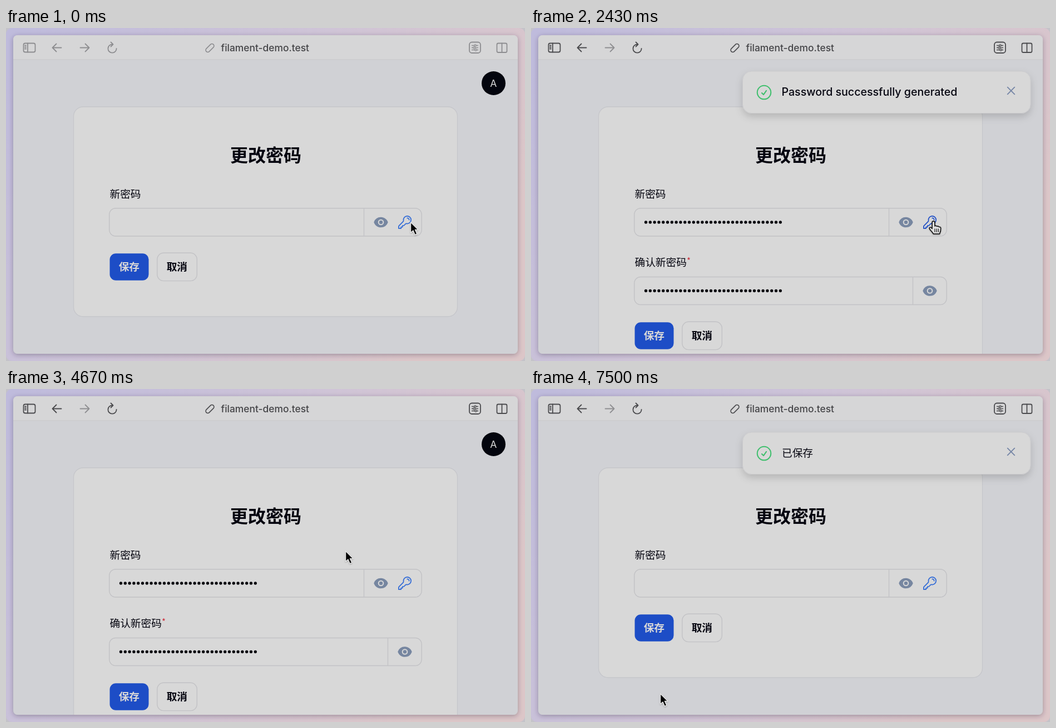
Recreate the animation shown at these times as an HTML page. Size 933x600 px, loop 7.53 s.

```html
<!DOCTYPE html>
<html lang="zh-CN">
<head>
<meta charset="utf-8">
<title>更改密码</title>
<style>
  html, body { margin: 0; width: 100%; height: 100%; overflow: hidden; background: #c4c3c9; }
  svg { display: block; width: 933px; height: 600px; }
  text { font-family: Inter, "Noto Sans CJK SC", "Noto Sans CJK", sans-serif; fill: #050510; }
  .zh { font: 500 18.7px "Noto Sans CJK SC", "Noto Sans CJK", sans-serif; }
  .title { font-size: 32px; font-weight: 700; }
  .bold { font-weight: 700; }
  .surface { fill: #d8d8d8; stroke: #c2c2c5; stroke-width: 1.4; }
  .line { fill: none; stroke-linecap: round; stroke-linejoin: round; }
  .dots { stroke: #08080f; stroke-width: 5.4; stroke-dasharray: 0 7.8; }
  .eye { fill: #7686a0; fill-rule: evenodd; }
  #tools { stroke-width: 1.8; }
</style>
</head>
<body>
<svg viewBox="0 0 933 600" xmlns="http://www.w3.org/2000/svg">
  <defs>
    <linearGradient id="wallpaper" x1="0" y1="0.1" x2="1" y2="0.5">
      <stop offset="0" stop-color="#bfbbdc"/>
      <stop offset="0.5" stop-color="#cfc4d7"/>
      <stop offset="1" stop-color="#dcc6c8"/>
    </linearGradient>
    <filter id="windowShadow" x="-5%" y="-5%" width="110%" height="112%">
      <feDropShadow dx="0" dy="2" stdDeviation="4" flood-color="#302840" flood-opacity="0.36"/>
    </filter>
    <filter id="toastShadow" x="-10%" y="-40%" width="120%" height="200%">
      <feDropShadow dx="0" dy="6" stdDeviation="7" flood-opacity="0.16"/>
    </filter>
    <filter id="cursorShadow" x="-50%" y="-50%" width="200%" height="200%">
      <feDropShadow dx="0" dy="1" stdDeviation="0.8" flood-opacity="0.3"/>
    </filter>
    <clipPath id="windowClip"><rect x="13" y="13" width="907" height="574" rx="8"/></clipPath>
    <path id="eyeIcon" class="eye" d="M10 12.5a2.5 2.5 0 1 0 0-5 2.5 2.5 0 0 0 0 5z M.664 10.59a1.651 1.651 0 0 1 0-1.186A10.004 10.004 0 0 1 10 3c4.257 0 7.893 2.66 9.336 6.41.147.381.146.804 0 1.186A10.004 10.004 0 0 1 10 17c-4.257 0-7.893-2.66-9.336-6.41zM14 10a4 4 0 1 1-8 0 4 4 0 0 1 8 0z" transform="scale(1.333) translate(-10 -10)"/>
  </defs>

  <rect width="933" height="600" rx="11" fill="url(#wallpaper)"/>
  <rect x="13" y="13" width="907" height="574" rx="8" fill="#d0d1d5" filter="url(#windowShadow)"/>

  <g clip-path="url(#windowClip)">
    <rect x="13" y="13" width="907" height="44" fill="#d6d6d7"/>
    <path d="M13 57H920" stroke="#c7c7ca" stroke-width="1.2"/>

    <g id="tools" class="line">
      <rect x="31.5" y="27.5" width="21" height="16" rx="3"/>
      <path d="M39 27.5V43.5M34 31.5h2M34 34.5h2M34 37.5h2"/>
      <path d="M99.5 35.5H83.500M90.500 28.500 83.500 35.500 90.500 42.500"/>
      <path d="M133.500 35.500H149.500M142.500 28.500 149.500 35.500 142.500 42.500" stroke="#8f8f92"/>
      <path d="M191 29.500A7.600 7.600 0 1 0 198.600 37M188.500 25.500 192.500 29.500 188.500 33.500"/>
      <g transform="translate(366.500 36) rotate(-45)" stroke-width="1.6">
        <path d="M2 -3.500H-5a3.500 3.500 0 0 0 0 7H-2.500M-2 3.500H5a3.500 3.500 0 0 0 0 -7H2.500" transform="scale(1.05)"/>
      </g>
      <rect x="833" y="25.500" width="20" height="19.500" rx="4.500"/>
      <path d="M837.500 31.500h4M845.500 31.500h3M837.500 35.500h2M843.500 35.500h5M837.500 39.500h5M846.500 39.500h2" stroke-width="1.3"/>
      <g stroke-width="1.3"><circle cx="843.500" cy="31.500" r="1.700"/><circle cx="841.500" cy="35.500" r="1.700"/><circle cx="844.500" cy="39.500" r="1.700"/></g>
      <rect x="882.500" y="27.500" width="18" height="16.500" rx="2.500"/>
      <path d="M891.500 27.500V44"/>
    </g>
    <text x="386.500" y="42" font-size="17.4" font-weight="500" style="fill:#444447">filament-demo.test</text>

    <circle cx="876.500" cy="99.500" r="21.500" fill="#03050e"/>
    <text x="876.300" y="106" font-size="17.500" text-anchor="middle" style="fill:#d8d8d8">A</text>

    <rect id="card" class="surface" x="121.500" y="142" width="690" height="378" rx="17" style="stroke:#c6c7cb"/>
    <text class="zh title" x="467" y="241" text-anchor="middle">更改密码</text>

    <text class="zh" x="186.500" y="305.500">新密码</text>
    <rect class="surface" x="185.700" y="324.700" width="561.500" height="50.300" rx="11.500"/>
    <path d="M643.500 325V375" stroke="#c2c2c5" stroke-width="1.3"/>
    <use href="#eyeIcon" x="0" y="0" transform="translate(674 350)"/>
    <path id="key" class="line" stroke-width="1.5" transform="translate(717 350) scale(1.14) translate(-12 -12)" d="M15.75 5.25a3 3 0 0 1 3 3m3 0a6 6 0 0 1-7.029 5.912c-.563-.097-1.159.026-1.563.43L10.5 17.25H8.25v2.25H6v2.25H2.25v-2.818c0-.597.237-1.17.659-1.591l6.499-6.499c.404-.404.527-1 .43-1.563A6 6 0 1 1 21.75 8.25Z"/>

    <g id="filled">
      <path class="line dots" d="M206.500 350H449"/>
      <text class="zh" x="186.500" y="429">确认新密码<tspan dy="-4" font-size="15" style="fill:#cc2634">*</tspan></text>
      <rect class="surface" x="185.700" y="448.500" width="561.500" height="50" rx="11.500"/>
      <path d="M686.500 449V498" stroke="#c2c2c5" stroke-width="1.3"/>
      <path class="line dots" d="M206.500 473.500H449"/>
      <use href="#eyeIcon" transform="translate(717 473.500)"/>
    </g>

    <g id="buttons">
      <rect id="save" x="186.500" y="406.300" width="70" height="48.500" rx="11"/>
      <text class="zh bold" x="202.700" y="437" style="fill:#d8d8d8">保存</text>
      <rect class="surface" x="271.800" y="405.300" width="71.500" height="50.300" rx="11.500"/>
      <text class="zh bold" x="288.700" y="437">取消</text>
    </g>

    <g id="toast">
      <rect x="380.500" y="78" width="517.500" height="75.500" rx="16" fill="#d8d8d8" stroke="#cbcbcd" filter="url(#toastShadow)"/>
      <path class="line" stroke="#3fbf6d" stroke-width="1.5" transform="translate(419 116) scale(1.36) translate(-12 -12)" d="M9 12.75 11.25 15 15 9.75M21 12a9 9 0 1 1-18 0 9 9 0 0 1 18 0Z"/>
      <text id="savedText" class="zh" x="451" y="122.300">已保存</text>
      <text id="madeText" x="450.500" y="122" font-size="19.600" font-weight="500">Password successfully generated</text>
      <path class="line" stroke="#7686a6" stroke-width="1.9" d="M856.700 106.700 869.300 119.300M869.300 106.700 856.700 119.300"/>
    </g>
  </g>

  <g id="cursor" filter="url(#cursorShadow)">
    <path id="arrow" d="M0.500 0V18.800L4.900 14.900 8.200 22.600 11.800 21 8.500 13.500H14Z" fill="#050505" stroke="#e4e4e4" stroke-width="1.400" stroke-linejoin="round"/>
    <g id="hand" class="line" transform="translate(-3.500 -1.500)" stroke="#080808" stroke-width="1.500">
      <path fill="#dcdcdc" d="M-2.400 2Q-2.400 -.4 0 -.4T2.400 2V8.500Q4.600 6.800 6.400 9Q8.600 7.800 10 10Q12.800 9.400 13.200 12Q13.600 17 11 22.500H0Q-2 19.500 -6 15Q-8.300 11.800 -6.600 10.800Q-4.800 9.800 -2.400 13Z"/>
      <path stroke-width="1.100" d="M2.500 13.500V19M5.700 13.500V19M8.900 13.500V19"/>
    </g>
  </g>
</svg>

<script>
const LOOP = 7530;
const TIMES = { focus: 420, fill: 1300, made: 1680, dismiss: 3830, reset: 5740, saved: 5800 };
const KEY = [727, 350], CLOSE = [877, 110], SAVE = [232, 549];
const MOVES = [
  { start: 2800, length: 650, from: KEY, bend: [771, 200], to: CLOSE },
  { start: 4300, length: 790, from: CLOSE, bend: [555, 330], to: SAVE }
];
const el = Object.fromEntries([...document.querySelectorAll('[id]')].map(node => [node.id, node]));

const clamp = v => Math.min(1, Math.max(0, v));
const progress = (t, start, length) => clamp((t - start) / length);
const easeInOut = p => p < 0.5 ? 4 * p ** 3 : 1 - 4 * (1 - p) ** 3;
const show = (node, on) => node.setAttribute('display', on ? 'inline' : 'none');
const near = (a, b) => Math.hypot(a[0] - b[0], a[1] - b[1]) < 18;

// cubic-bezier(.4, 0, .2, 1)
function smooth(x) {
  let low = 0, high = 1;
  for (let i = 0; i < 20; i++) {
    const u = (low + high) / 2;
    const at = 1.2 * u * (1 - u) ** 2 + 0.6 * u * u * (1 - u) + u ** 3;
    if (at < x) low = u; else high = u;
  }
  return low * low * (3 - 2 * low);
}

function cursorAt(t) {
  const move = t < MOVES[1].start ? MOVES[0] : MOVES[1];
  const s = easeInOut(progress(t, move.start, move.length));
  return move.from.map((a, i) =>
    a * (1 - s) ** 2 + 2 * s * (1 - s) * move.bend[i] + s * s * move.to[i]);
}

function drawToast(t) {
  const saved = t >= TIMES.saved;
  const enter = smooth(progress(t, saved ? TIMES.saved : TIMES.made, 300));
  const leave = saved ? 0 : smooth(progress(t, TIMES.dismiss, 300));
  const scale = 1 - 0.05 * leave;
  show(el.toast, enter > 0 && leave < 0.999);
  show(el.savedText, saved);
  show(el.madeText, !saved);
  el.toast.setAttribute('opacity', enter * (1 - leave));
  el.toast.setAttribute('transform',
    `translate(${64 * (1 - enter) + 639.5} 115.5) scale(${scale}) translate(-639.5 -115.5)`);
}

function draw(t) {
  const active = t >= TIMES.focus;
  const open = t >= TIMES.fill && t < TIMES.reset;
  const pointer = cursorAt(t);
  const onKey = active && near(pointer, KEY);
  const onSave = open && pointer[0] > 187 && pointer[0] < 256 && pointer[1] > 530 && pointer[1] < 578;
  const pointing = onKey || near(pointer, CLOSE);

  el.tools.setAttribute('stroke', active ? '#4b4b4e' : '#8d8d90');
  show(el.filled, open);
  el.card.setAttribute('height', open ? 502 : 378);
  el.buttons.setAttribute('transform', `translate(0 ${open ? 124 : 0})`);
  el.key.setAttribute('stroke', onKey ? '#1d4dc6' : '#2f69d6');
  el.save.setAttribute('fill', onSave ? '#2d66d5' : '#1d4dc6');
  drawToast(t);
  el.cursor.setAttribute('transform', `translate(${pointer})`);
  show(el.hand, pointing);
  show(el.arrow, !pointing);
}

const origin = performance.now();
function tick() {
  draw((performance.now() - origin) % LOOP);
  requestAnimationFrame(tick);
}
draw(0);
requestAnimationFrame(tick);
</script>
</body>
</html>
```
